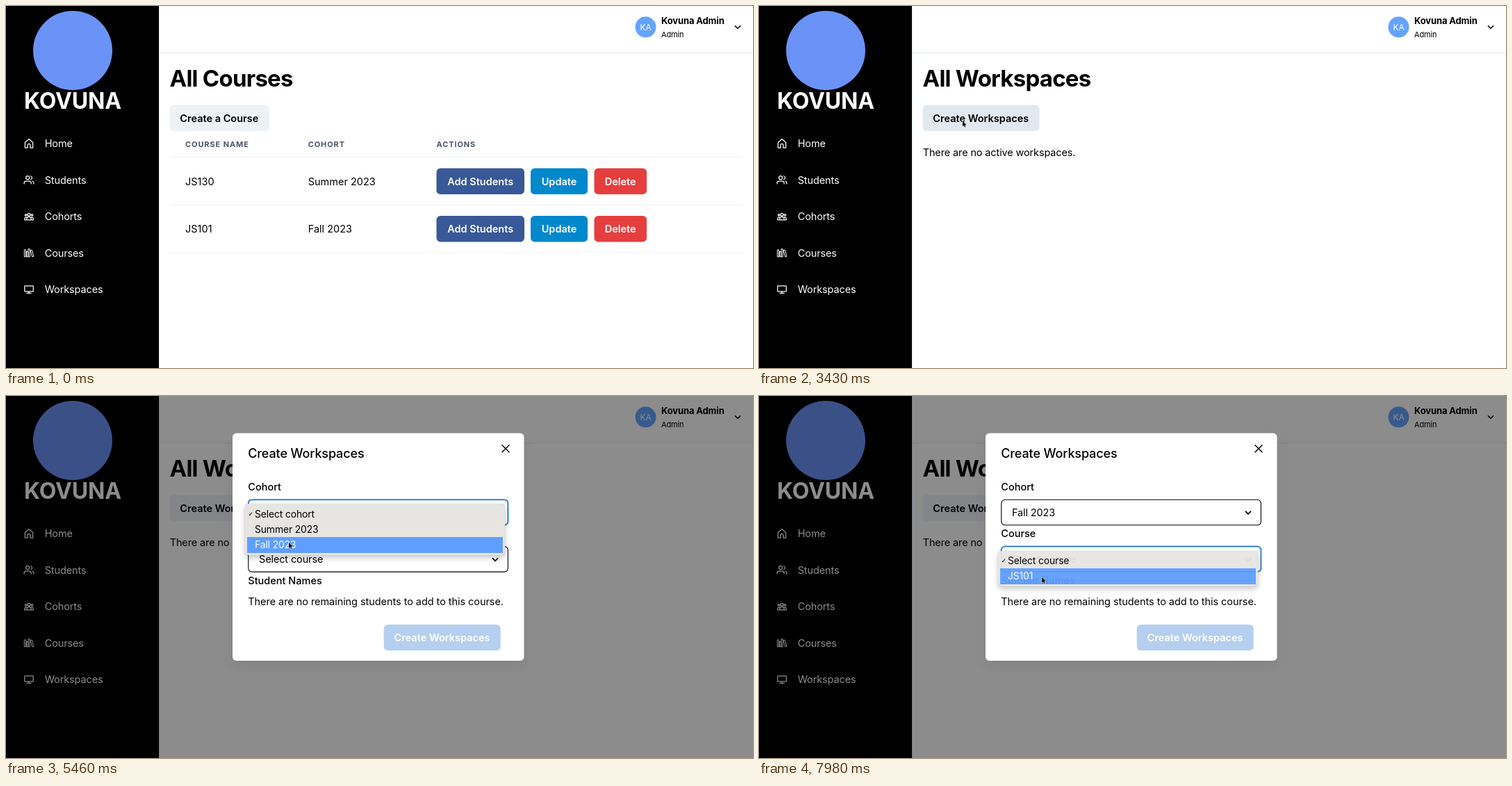
Recreate the animation shown at these times as an HTML page. Size 1075x521 px, loop 8 s.

```html
<!DOCTYPE html>
<html lang="en">
<head>
<meta charset="utf-8">
<title>Course admin</title>
<style>
html, body { margin: 0; width: 1075px; height: 521px; overflow: hidden; background: #fff; }
body { position: relative; font: 14.5px Inter, "Open Sans", sans-serif; letter-spacing: -.009em; }
svg { position: absolute; left: 0; top: 0; width: 1075px; height: 521px; }
text { white-space: pre; }

.title { font-size: 33px; font-weight: 700; letter-spacing: -.023em; }
.semi { font-weight: 600; letter-spacing: 0; }
.medium { font-weight: 500; letter-spacing: 0; }
.modal-title { font-size: 18px; font-weight: 500; letter-spacing: -.007em; }
.note { letter-spacing: -.004em; }
.cells { letter-spacing: 0; }
.th { font-size: 11px; font-weight: 700; letter-spacing: .9px; fill: #4a5568; }
.mid { text-anchor: middle; }
.line { fill: none; stroke: currentColor; stroke-linecap: round; stroke-linejoin: round; }
.icons { color: #fff; stroke-width: 2; }
.card { fill: #fff; filter: drop-shadow(0 10px 8px rgba(0, 0, 0, .05)); }

/* One 8 s clock for every part; hard switches unless a part says otherwise */
.a { animation: 8s step-end infinite both; }
.nav-hover { animation-name: nav-hover; }
.courses { animation-name: courses; }
.works { animation-name: works; }
.btn-hover { animation-name: btn-hover; }
.dim { animation-name: dim; }
.modal { animation-name: modal; transform-origin: 535.75px 217.25px; }
.before { animation-name: before; }
.after { animation-name: after; }
.ring1 { animation-name: ring1; animation-timing-function: linear; }
.ring2 { animation-name: ring2; animation-timing-function: linear; }
.pointer { animation-name: move; animation-timing-function: ease-in-out; }
.arrow { animation-name: arrow; }
.hand { animation-name: hand; }

@keyframes nav-hover { 0% { opacity: 0 } 15.7% { opacity: 1 } 34.2%, 100% { opacity: 0 } }
@keyframes courses { 0% { opacity: 1 } 26.2%, 100% { opacity: 0 } }
@keyframes works { 0% { opacity: 0 } 26.2%, 100% { opacity: 1 } }
@keyframes btn-hover { 0% { fill: #edf2f7 } 40.2% { fill: #e2e8f0 } 47.2%, 100% { fill: #edf2f7 } }
@keyframes dim {
  0% { opacity: 0 } 44.6% { opacity: .13 } 47.2% { opacity: .27 }
  48.9% { opacity: .41 } 49.8%, 100% { opacity: .45 }
}
@keyframes modal {
  0% { opacity: 0; transform: scale(.95) }
  44.6% { opacity: .28; transform: scale(.965) }
  47.2% { opacity: .62; transform: scale(.981) }
  48.9% { opacity: .9; transform: scale(.995) }
  49.8%, 100% { opacity: 1; transform: none }
}
@keyframes before { 0% { opacity: 1 } 73.4%, 100% { opacity: 0 } }
@keyframes after { 0% { opacity: 0 } 73.4%, 100% { opacity: 1 } }
@keyframes ring1 {
  0%, 59.7% { stroke: #000; stroke-width: 1.1px }
  62%, 85.5% { stroke: #3182ce; stroke-width: 2px }
  88%, 100% { stroke: #000; stroke-width: 1.1px }
}
@keyframes ring2 {
  0%, 85.5% { stroke: #000; stroke-width: 1.1px }
  86% { stroke: #9dbbe6; stroke-width: 1.1px }
  88%, 100% { stroke: #3182ce; stroke-width: 2px }
}

.menu {
  position: absolute; left: 343.5px; width: 368px; padding: 3.5px 3px;
  border-radius: 5px; background: #e7e5e2; font-size: 13.9px;
  box-shadow: 0 0 1px rgba(0, 0, 0, .4), 0 4px 8px rgba(0, 0, 0, .22);
}
.menu div { position: relative; height: 22.4px; line-height: 22.4px; padding-left: 11.5px; }
.menu .check::before {
  content: "✓"; position: absolute; left: 2px; font: 700 9px/22.4px "DejaVu Sans", sans-serif;
}
.cohort-menu { top: 155px; animation-name: cohort-menu; }
.course-menu { top: 222.5px; animation-name: course-menu; }
.s1 { animation-name: s1; } .s2 { animation-name: s2; } .s3 { animation-name: s3; }
.c1 { animation-name: c1; } .c2 { animation-name: c2; }

@keyframes cohort-menu {
  0% { opacity: 0 } 62.9% { opacity: 1 }
  73.4% { opacity: 1; animation-timing-function: linear } 75.2%, 100% { opacity: 0 }
}
@keyframes course-menu {
  0% { opacity: 0 } 85.7% { opacity: 1 }
  99.6% { opacity: 1; animation-timing-function: linear } 100% { opacity: .88 }
}
@keyframes s1 { 0% { background: #5f9eff; color: #fff } 64.5%, 100% { background: #e7e5e2; color: #000 } }
@keyframes s2 {
  0% { background: #e7e5e2; color: #000 } 64.5% { background: #5f9eff; color: #fff }
  66.7%, 100% { background: #e7e5e2; color: #000 }
}
@keyframes s3 { 0% { background: #e7e5e2; color: #000 } 66.7%, 100% { background: #5f9eff; color: #fff } }
@keyframes c1 { 0% { background: #5f9eff; color: #fff } 92.2%, 100% { background: #e7e5e2; color: #000 } }
@keyframes c2 { 0% { background: #e7e5e2; color: #000 } 92.2%, 100% { background: #5f9eff; color: #fff } }

@keyframes move {
  0%, 4.3% { transform: translate(806px, 508px) }
  12.2% { transform: translate(115px, 407px) }
  31.5% { transform: translate(115px, 407px); animation-timing-function: ease-in }
  35% { transform: translate(230px, 360px); animation-timing-function: linear }
  38.1% { transform: translate(340px, 230px); animation-timing-function: ease-out }
  41.1%, 49.8% { transform: translate(293px, 165.5px) }
  57.7%, 63% { transform: translate(405px, 168px) }
  65.6% { transform: translate(408px, 190px) }
  67.4%, 75.2% { transform: translate(407px, 211px) }
  83.1%, 89.2% { transform: translate(410px, 231px) }
  94.5%, 100% { transform: translate(407px, 261px) }
}
@keyframes arrow { 0% { opacity: 0 } 4.3% { opacity: 1 } 13.9% { opacity: 0 } 34.2%, 100% { opacity: 1 } }
@keyframes hand { 0% { opacity: 0 } 13.9% { opacity: 1 } 34.2%, 100% { opacity: 0 } }
</style>
</head>
<body>
<svg viewBox="0 0 1075 521">
  <defs>
    <g id="actions" class="semi" fill="#fff">
      <rect x="619.5" width="126.5" height="37.5" rx="5.6" fill="#385898"/>
      <rect x="755" width="82" height="37.5" rx="5.6" fill="#0088cc"/>
      <rect x="846.5" width="75.5" height="37.5" rx="5.6" fill="#e53e3e"/>
      <g class="mid">
        <text x="682.7" y="24">Add Students</text>
        <text x="796" y="24">Update</text>
        <text x="884.2" y="24">Delete</text>
      </g>
    </g>
    <path id="chevron" class="line" d="M-3.6-1.8 0 1.8 3.6-1.8"/>
  </defs>

  <!-- Sidebar -->
  <rect width="220" height="521"/>
  <rect x="220" width="1" height="521" fill="#e2e8f0"/>
  <circle cx="96" cy="64" r="57" fill="#6b92f6"/>
  <text class="mid" x="96" y="148" font-size="32" font-weight="700" fill="#fff">KOVUNA</text>
  <rect class="a nav-hover" x="10.5" y="381" width="195" height="52.5" rx="7.5" fill="#06c6ee"/>
  <g fill="#fff">
    <text x="55.7" y="203.3">Home</text>
    <text x="55.7" y="255.8">Students</text>
    <text x="55.7" y="308.3">Cohorts</text>
    <text x="55.7" y="360.8">Courses</text>
    <text x="55.7" y="413.3">Workspaces</text>
  </g>
  <g class="icons">
    <path class="line" transform="translate(25.5 190.3) scale(.625)" d="M3 10 12 2l9 8v12h-6v-6a3 3 0 0 0-6 0v6H3z"/>
    <path class="line" transform="translate(25.5 242.8) scale(.625)" d="M17 21v-2a4 4 0 0 0-4-4H5a4 4 0 0 0-4 4v2M5 7a4 4 0 0 1 8 0 4 4 0 0 1-8 0M23 21v-2a4 4 0 0 0-3-3.9M16 3.1a4 4 0 0 1 0 7.8"/>
    <path class="line" transform="translate(25.5 295.3) scale(.625)" d="M9 8a3 3 0 0 1 6 0 3 3 0 0 1-6 0M3 9a2 2 0 0 1 4 0 2 2 0 0 1-4 0M17 9a2 2 0 0 1 4 0 2 2 0 0 1-4 0M7 20v-2a5 5 0 0 1 10 0v2zM7 20H2v-3a3 3 0 0 1 5-2M17 20h5v-3a3 3 0 0 0-5-2"/>
    <path class="line" transform="translate(25.5 347.8) scale(.625)" stroke-width="1.6" d="M2 5h3v16H2zM7 9h3v12H7zM11 3h3v18h-3zM16 6l3-.6L23 20l-3 .8z"/>
    <path class="line" transform="translate(25.5 400.3) scale(.625)" d="M3 4h18a1 1 0 0 1 1 1v11a1 1 0 0 1-1 1H3a1 1 0 0 1-1-1V5a1 1 0 0 1 1-1M12 17v4M7 21h10"/>
  </g>

  <!-- Top bar -->
  <rect x="221" y="67" width="854" height="1" fill="#e2e8f0"/>
  <circle cx="920.5" cy="30.3" r="15" fill="#64a3ff"/>
  <text class="mid" x="920.5" y="34.7" font-size="12" fill="#fff">KA</text>
  <text x="943" y="26.2" font-size="13" font-weight="700">Kovuna Admin</text>
  <text x="943" y="44.8" font-size="11">Admin</text>
  <use href="#chevron" x="1053" y="30.5" stroke-width="1.6"/>

  <g class="a courses">
    <text class="title" x="235.5" y="116">All Courses</text>
    <rect x="235.5" y="142.5" width="143.5" height="37.5" rx="5.6" fill="#edf2f7"/>
    <text class="semi" x="250.3" y="166.5">Create a Course</text>
    <g class="th">
      <text x="258" y="202.8">COURSE NAME</text>
      <text x="434.7" y="202.8">COHORT</text>
      <text x="619.5" y="202.8">ACTIONS</text>
    </g>
    <path d="M235.5 217.5H1060M235.5 286.5H1060M235.5 354.5H1060" stroke="#edf2f7"/>
    <g class="cells">
      <text x="258" y="257.8">JS130</text>
      <text x="434.7" y="257.8">Summer 2023</text>
      <text x="258" y="326.2">JS101</text>
      <text x="434.7" y="326.2">Fall 2023</text>
    </g>
    <use href="#actions" y="233.5"/>
    <use href="#actions" y="302"/>
  </g>

  <g class="a works">
    <text class="title" x="235.5" y="116">All Workspaces</text>
    <rect class="a btn-hover" x="235.5" y="142.5" width="168" height="37.5" rx="5.6"/>
    <text class="semi" x="250.3" y="166.5">Create Workspaces</text>
    <text x="235.7" y="215.5">There are no active workspaces.</text>
  </g>

  <rect class="a dim" width="1075" height="521"/>

  <g class="a modal">
    <rect class="card" x="326" y="53.5" width="419.5" height="327.5" rx="5.6"/>
    <text class="modal-title" x="348.3" y="89">Create Workspaces</text>
    <path class="line" d="M714 70.7l10 10m0-10-10 10" stroke-width="1.5"/>
    <text class="medium" x="348.3" y="135.8">Cohort</text>
    <rect class="a ring1" x="348.8" y="149.3" width="373.6" height="36.5" rx="5.2" fill="#fff"/>
    <text class="a before" x="364" y="173">Select cohort</text>
    <text class="a after" x="364" y="173">Fall 2023</text>
    <use href="#chevron" x="704" y="168" stroke-width="1.7"/>
    <text class="medium" x="348.3" y="203.2">Course</text>
    <rect class="a ring2" x="348.8" y="216.6" width="373.6" height="36.5" rx="5.2" fill="#fff"/>
    <text x="364" y="240.4">Select course</text>
    <use href="#chevron" x="704" y="235.5" stroke-width="1.7"/>
    <text class="medium" x="348.3" y="270.7">Student Names</text>
    <text class="note" x="348.3" y="300.7">There are no remaining students to add to this course.</text>
    <rect x="543.7" y="329" width="168" height="37.2" rx="5.6" fill="#b4cff0"/>
    <text class="semi mid" x="627.5" y="353" fill="#fff">Create Workspaces</text>
  </g>
</svg>

<div class="menu a cohort-menu">
  <div class="a s1 check">Select cohort</div>
  <div class="a s2">Summer 2023</div>
  <div class="a s3">Fall 2023</div>
</div>
<div class="menu a course-menu">
  <div class="a c1 check">Select course</div>
  <div class="a c2">JS101</div>
</div>

<svg viewBox="0 0 1075 521">
  <g class="a pointer">
    <path class="a arrow" d="M0 0v8l1.9-1.7 1.2 2.8 1.3-.6-1.2-2.7h2.6z" stroke="#fff" stroke-width="1" paint-order="stroke"/>
    <path class="a hand" d="M-1 0a1 1 0 0 1 2 0v4l3.6.8q1.4.4 1.1 2l-.8 4.2h-5.4l-3.3-4.4q-.4-1.7 1.8-.7z" fill="#fff" stroke="#000" stroke-width=".9" stroke-linejoin="round"/>
  </g>
</svg>
</body>
</html>
```
